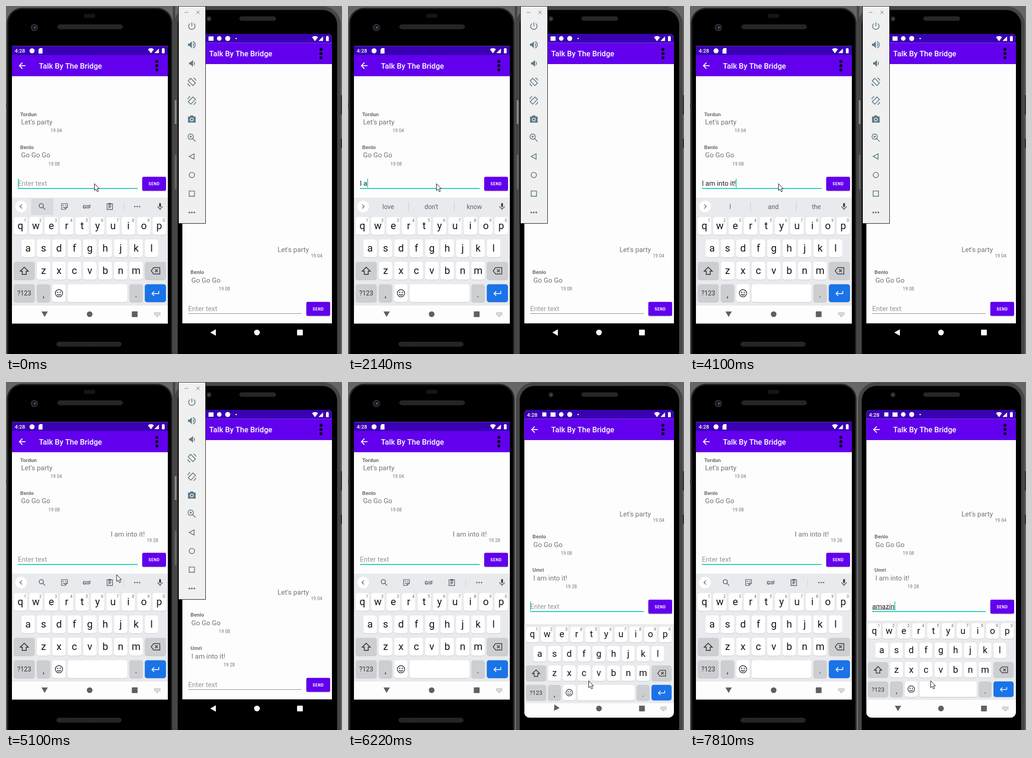
Write an HTML page with a canvas that moves like this. It is 735 px wide and 761 px high and loops after 8000 ms.

```html
<!DOCTYPE html>
<html lang="en">
<head>
<meta charset="utf-8">
<title>Two phones chatting</title>
<style>
html, body { margin: 0; height: 100%; overflow: hidden; background: #000; }
canvas { display: block; }
</style>
</head>
<body>
<canvas id="stage" width="735" height="761"></canvas>
<script>
const ctx = document.getElementById('stage').getContext('2d');
const LOOP = 8000;
const PURPLE = '#6200ee', DARK_PURPLE = '#3a00b3', TEAL = '#16cdbb', SLATE = '#5b7886', GREY = '#757575', KEY_INK = '#5f6368';
const TITLE = 'Talk By The Bridge';
const FIRST = 'Tordun', SECOND = 'Benlo', THIRD = 'Umri';

const RAISE_RIGHT = 5800, FOCUS_RIGHT = 5910, KEYBOARD_UP = 6080, KEYBOARD_DONE = 6340;

const LEFT = { x: 13, right: 354, top: 87.5, bar: 107, body: 153.5 };
const RIGHT = { x: 385.5, right: 713, top: 61, bar: 80.5, body: 127 };
const LEFT_KEYS = { x: 14.6, cell: 33.75, cy: 481, pitch: 49, h: 39, size: 22 };
const RIGHT_KEYS = { x: 387.1, cell: 32.3, cy: 544.5, pitch: 42.4, h: 34, size: 20 };

// time, text, index where the composing underline starts, suggestions
const LEFT_TYPING = [
  [0, '', -1, null],
  [420, 'I', -1, []],
  [610, 'I', 0, []],
  [650, 'I', 0, ['I', "I'm", "I'll"]],
  [1970, 'I ', 0, ['I', "I'm", "I'll"]],
  [2140, 'I a', -1, ['love', "don't", 'know']],
  [2270, 'I a', 2, ['a', 'am', 'and']],
  [2430, 'I am', 2, ['am', 'an', 'amazing']],
  [2640, 'I am ', 2, ['am', 'an', 'amazing']],
  [2680, 'I am ', -1, ['not', 'a', 'so']],
  [2720, 'I am i', -1, ['not', 'a', 'so']],
  [2760, 'I am i', 5, ['in', 'I', 'interested']],
  [2900, 'I am in', 5, ['in', 'I', 'interested']],
  [3000, 'I am int', 5, ['int', 'into', 'interested']],
  [3060, 'I am into', 5, ['into', 'intro', 'onto']],
  [3100, 'I am into ', 5, ['into', 'intro', 'onto']],
  [3310, 'I am into i', -1, ['a', 'the', 'it']],
  [3530, 'I am into i', 10, ['it', 'I', 'is']],
  [3570, 'I am into it', 10, ['it', 'I', 'is']],
  [3600, 'I am into it', 10, ['it', 'its', "it's"]],
  [3860, 'I am into it!', 10, ['it', 'its', "it's"]],
  [4100, 'I am into it!', -1, ['I', 'and', 'the']],
  [4260, '', -1, null]
];
const RIGHT_TYPING = [
  [0, '', -1], [7000, 'a', -1], [7080, 'a', 0], [7150, 'am', 0], [7400, 'ama', 0],
  [7520, 'amaz', 0], [7640, 'amazi', 0], [7810, 'amazin', 0]
];
const LEFT_BLINK = [[200, 420], [1100, 1600], [4760, 5260], [5760, 6260], [6700, 7190], [7700, 8000]];
const RIGHT_BLINK = [[0, FOCUS_RIGHT], [6410, 6910]];
const POINTER_PATH = [[5020, 193, 388], [5100, 240, 419], [5180, 365, 560], [5260, 480, 672], [5560, 480, 672], [5640, 526, 653]];

const latest = (steps, t) => steps.findLast(step => step[0] <= t);
const within = (spans, t) => spans.some(([from, to]) => t >= from && t < to);

function box(x, y, w, h, color, r = 0, stroke) {
  ctx.beginPath();
  ctx.roundRect(x, y, w, h, r);
  if (color) { ctx.fillStyle = color; ctx.fill(); }
  if (stroke) { ctx.strokeStyle = stroke; ctx.lineWidth = 1; ctx.stroke(); }
}
function disc(x, y, r, color) {
  ctx.fillStyle = color;
  ctx.beginPath();
  ctx.arc(x, y, r, 0, 7);
  ctx.fill();
}
function label(text, x, y, size, color, { weight = 400, align = 'left', spacing = 0 } = {}) {
  ctx.font = `${weight} ${size}px Roboto, sans-serif`;
  ctx.letterSpacing = spacing + 'px';
  ctx.textAlign = align;
  ctx.fillStyle = color;
  ctx.fillText(text, x, y);
  return ctx.measureText(text).width;
}
// Icons live on a 24-unit grid centred on x, y.
function icon(x, y, size, color, lines, solid, width = 2) {
  ctx.save();
  ctx.translate(x - size / 2, y - size / 2);
  ctx.scale(size / 24, size / 24);
  ctx.strokeStyle = ctx.fillStyle = color;
  ctx.lineWidth = width;
  if (lines) ctx.stroke(new Path2D(lines));
  if (solid) ctx.fill(new Path2D(solid), 'evenodd');
  ctx.restore();
}
function dots(x, y, gap, r, color, vertical) {
  for (const i of [-1, 0, 1]) disc(x + (vertical ? 0 : i * gap), y + (vertical ? i * gap : 0), r, color);
}
function triangle(x, y, r, angle, color) {
  ctx.fillStyle = color;
  ctx.beginPath();
  for (let i = 0; i < 3; i++) {
    const a = angle + i * Math.PI * 2 / 3;
    ctx.lineTo(x + r * Math.cos(a), y + r * Math.sin(a));
  }
  ctx.fill();
}

function speaker(x, y, w, h) {
  box(x, y, w, h, '#242424', h / 2, '#343434');
  ctx.strokeStyle = '#303030';
  ctx.lineWidth = 1;
  ctx.setLineDash([2, 2]);
  ctx.beginPath();
  ctx.moveTo(x + 4, y + h / 2);
  ctx.lineTo(x + w - 4, y + h / 2);
  ctx.stroke();
  ctx.setLineDash([]);
}
function shell(x, y, w, r, rim, rimColor) {
  box(x, y, w, 820, rimColor, r, '#5c5c5c');
  box(x + rim, y + rim, w - 2 * rim, 820, '#000', r - rim, '#2c2c2c');
}

function header(s) {
  const w = s.right - s.x, mid = s.top + 10.5;
  box(s.x, s.top, w, s.bar - s.top, DARK_PURPLE);
  box(s.x, s.bar, w, s.body - s.bar, PURPLE);
  label('4:28', s.x + 6, mid + 4, 11.6, '#fff', { weight: 500 });
  icon(s.right - 37, mid, 13, '#fff', '', 'M12 22L0 6a18 18 0 0 1 24 0z');
  icon(s.right - 24.5, mid, 12, '#fff', '', 'M2 22L22 2v20z');
  box(s.right - 13, mid - 5, 6, 10.5, '#fff', 1);
  box(s.right - 11.5, mid - 6, 3, 2, '#fff');
  const cy = s.bar + 23.5;
  icon(s.x + 23, cy, 18, '#fff', 'M21 12H4M12 3l-9 9 9 9', '', 2.4);
  label(TITLE, s.x + 59, cy + 6.3, 16.6, '#fff', { weight: 500 });
  dots(s.right - 24, cy, 9.2, 3.3, '#000', true);
}
function incoming(s, y, name, text, time) {
  label(name, s.x + 18, y - 18.5, 11.6, '#6f6f6f', { weight: 700 });
  const w = label(text, s.x + 20, y, 15, GREY);
  label(time, s.x + 16 + w, y + 17.4, 10, GREY);
}
function outgoing(s, y, text, time) {
  label(text, s.right - 50.5, y, 15, GREY, { align: 'right' });
  label(time, s.right - 46, y + 11.5, 10, GREY);
}
function inputRow(s, y, [, text, from], focused, caret) {
  const x = s.x + 13, size = 15;
  if (text) label(text, x, y + 5, size, '#212121');
  else label('Enter text', x, y + 5, size, '#969696');
  const width = part => ctx.measureText(part).width;
  if (from >= 0) {
    const start = width(text.slice(0, from));
    box(x + start, y + 6.3, width(text.trimEnd()) - start, 1, '#333');
  }
  box(x, Math.floor(y + 10.5), s.right - 66 - x, focused ? 2 : 1, focused ? TEAL : '#858585');
  if (caret) box(x + (text ? width(text) : 0), y - 10.5, 1.7, 19.5, TEAL);
  ctx.save();
  ctx.shadowColor = 'rgba(0,0,0,.3)';
  ctx.shadowBlur = 2;
  ctx.shadowOffsetY = 1;
  box(s.right - 56, y - 14.5, 52, 30.5, PURPLE, 3);
  ctx.restore();
  label('SEND', s.right - 30, y + 4, 8.6, '#fff', { weight: 700, align: 'center', spacing: 0.7 });
}

function keyboard({ x, cell, cy, pitch, h, size }, shifted) {
  const key = (from, span, row, color) => {
    const left = x + from * cell + 2.2, top = cy + row * pitch - h / 2;
    box(left, top + 1, span * cell - 4.4, h, '#c3c6ca', 5);
    box(left, top, span * cell - 4.4, h, color, 5);
    return [left + span * cell / 2 - 2.2, cy + row * pitch];
  };
  const letters = (row, start, keys) => [...keys].forEach((char, i) => {
    const [kx, ky] = key(start + i, 1, row, '#fff');
    label(char, kx, ky + size * 0.32, size, '#151515', { align: 'center' });
    if (row === 0) label((i + 1) % 10, kx + cell * 0.3, ky - h * 0.24, 8.6, KEY_INK, { align: 'center' });
  });
  const GREY_KEY = '#cdced2', scale = size / 22;
  letters(0, 0, 'qwertyuiop');
  letters(1, 0.5, 'asdfghjkl');
  letters(2, 1.5, 'zxcvbnm');
  let [kx, ky] = key(0, 1.5, 2, GREY_KEY);
  const arrow = 'M12 3L2 13h5v8h10v-8h5z';
  icon(kx, ky, 21 * scale, '#333', arrow, shifted ? arrow : '');
  [kx, ky] = key(8.5, 1.5, 2, GREY_KEY);
  icon(kx, ky, 21 * scale, '#444', 'M7.5 4H23v16H7.5L1.5 12zM11 8.5l7 7M18 8.5l-7 7');
  [kx, ky] = key(0, 1.5, 3, GREY_KEY);
  label('?123', kx, ky + 5, 14 * scale, '#333', { align: 'center' });
  [kx, ky] = key(1.5, 1, 3, GREY_KEY);
  label(',', kx, ky + 9, 19 * scale, '#333', { align: 'center' });
  [kx, ky] = key(2.5, 1, 3, '#fff');
  icon(kx, ky, 19 * scale, '#333', 'M22 12a10 10 0 1 1-20 0 10 10 0 0 1 20 0M7 14a5.5 5.5 0 0 0 10 0', 'M7 8h3v3H7zM14 8h3v3h-3z');
  key(3.5, 4, 3, '#fff');
  [kx, ky] = key(7.5, 1, 3, GREY_KEY);
  label('.', kx, ky + 9, 19 * scale, '#333', { align: 'center' });
  [kx, ky] = key(8.5, 1.5, 3, '#1a73e8');
  icon(kx, ky, 20 * scale, '#fff', 'M21 6v7H4M9 7l-6 6 6 6');
}
function suggestionStrip(words, highlight) {
  const y = 438.5;
  if (highlight) box(55, 421, 48.5, 36, '#d8dadd');
  disc(33, y, 12.8, '#fff');
  icon(33, y, 15, '#444', words ? 'M9 5l7 7-7 7' : 'M15 5l-7 7 7 7');
  icon(337, y, 17, '#444', 'M5 11a7 7 0 0 0 14 0M12 18v5', 'M9 4a3 3 0 0 1 6 0v7a3 3 0 0 1-6 0z');
  if (words) {
    words.forEach((word, i) => label(word, 88 + i * 94.2, y + 5.5, 14, KEY_INK, { align: 'center' }));
    for (const x of [132, 232]) box(x, 428, 1, 20, '#c4c7cb');
    return;
  }
  icon(79, y, 17, KEY_INK, 'M16 9.5a6.5 6.5 0 1 1-13 0 6.5 6.5 0 0 1 13 0M14.5 14.5l7 7', '', 2.4);
  icon(128, y, 17, KEY_INK, 'M3 3h18v11l-7 7H3zM21 14h-7v7M7 13a5 5 0 0 0 7 2', 'M7 7h3v3H7zM14 7h3v3h-3z');
  label('GIF', 177, y + 4, 11, KEY_INK, { weight: 900, align: 'center', spacing: 0.5 });
  icon(227, y, 18, KEY_INK, 'M4 4h16v17H4zM8 10h8M8 13h8M8 16h5', 'M8 2h8v5H8z');
  box(257, 430, 1, 17, '#cfd2d5');
  dots(287, y, 5.2, 1.6, KEY_INK);
}
function keyboardIcon(x, y, color) {
  for (let row = 0; row < 3; row++)
    for (let col = 0; col < 6; col++) box(x - 6.6 + col * 2.4, y - 4 + row * 2.4, 1.2, 1.2, color);
  box(x - 2.5, y + 3.8, 5, 1, color);
}
function navigation(s, y, color, angle, withKeyboard) {
  const [back, home, recent, keys] = s === LEFT ? [84.5, 183, 281.5, 331] : [455, 549, 643, 690];
  triangle(back, y - 2 * Math.sin(angle), 8, angle, color);
  disc(home, y, 6.2, color);
  box(recent - 6.3, y - 6.3, 12.6, 12.6, color, 1);
  if (withKeyboard) keyboardIcon(keys, y, color);
}

function leftPhone(t) {
  const s = LEFT, typing = latest(LEFT_TYPING, t), sent = t >= 4260;
  shell(1.5, 3.5, 363, 34, 3, '#1d1d1d');
  box(0, 212, 3, 10, '#3c3c3c');
  box(171, 17, 24, 9, '#151515', 3);
  disc(62, 47, 8, '#2b2b2f');
  disc(62, 47, 5, '#15151f');
  disc(63, 47, 2, '#63639a');
  speaker(113, 41, 142, 9);
  speaker(111, 735, 141, 9);
  box(s.x, s.top, 341, 694.5 - s.top, '#fdfdfd');
  header(s);
  disc(57, 98, 5.5, '#fff');
  icon(75.5, 98, 13, '#fff', '', 'M9 1h11v22H4V7z');

  ctx.save();
  ctx.beginPath();
  ctx.rect(s.x, 166, 341, 200);
  ctx.clip();
  const y = sent ? 193 : 259;
  incoming(s, y, FIRST, "Let's party", '19 04');
  incoming(s, y + 72.3, SECOND, 'Go Go Go', '19 08');
  if (sent) outgoing(s, 338, 'I am into it!', '19 28');
  ctx.restore();

  inputRow(s, 388, typing, true, !within(LEFT_BLINK, t));
  box(s.x, 419, 341, 236, '#e8eaed');
  suggestionStrip(typing[3], t < 420);
  keyboard(LEFT_KEYS, within([[420, 450], [3860, 3900]], t));
  navigation(s, 674, '#5f6063', Math.PI / 2, true);
}

function rightPhone(t) {
  const s = RIGHT, lifted = t >= KEYBOARD_UP, received = t >= 4360;
  const progress = Math.min(1, Math.max(0, (t - KEYBOARD_UP) / (KEYBOARD_DONE - KEYBOARD_UP)));
  shell(367.5, 0.5, 365, 40, 8, '#454545');
  box(732.5, 195, 3, 42, '#2e2e2e');
  box(732.5, 290, 3, 20, '#2e2e2e');
  disc(444, 28, 5.5, '#25252a');
  disc(444, 28, 2.5, '#45454e');
  speaker(511, 23.5, 79, 8);

  ctx.save();
  ctx.beginPath();
  ctx.roundRect(s.x, s.top, s.right - s.x, (lifted ? 734 : 694) - s.top, lifted ? [9, 9, 12, 12] : [9, 9, 0, 0]);
  ctx.clip();
  box(s.x, s.top, 328, 680, '#fdfdfd');
  header(s);
  box(425, 66.5, 9, 9, '#fff');
  box(443, 66.5, 11, 9.5, '#fff');
  disc(466.5, 71, 5, '#fff');
  disc(485, 71, 5.5, '#fff');
  disc(503.5, 71, 1.6, '#fff');

  const lift = lifted ? 171 : 0, y = (received ? 465.3 : 538.3) - lift;
  outgoing(s, y, "Let's party", '19 04');
  incoming(s, y + 66.3, SECOND, 'Go Go Go', '19 08');
  if (received) incoming(s, y + 139.2, THIRD, 'I am into it!', '19 28');
  const focused = t >= FOCUS_RIGHT;
  inputRow(s, 661.5 - lift, latest(RIGHT_TYPING, t), focused, focused && !within(RIGHT_BLINK, t));
  if (lifted) {
    const drop = 172 * (1 - progress) ** 4;
    box(s.x, 522 + drop, 328, 173, '#e8eaed');
    keyboard({ ...RIGHT_KEYS, cy: RIGHT_KEYS.cy + drop }, false);
  }
  ctx.restore();
  const turn = 1 - (1 - progress) ** 1.2;
  navigation(s, 714, lifted ? '#5f6063' : '#fff', Math.PI * (1 - turn / 2), focused);
}

function toolbar() {
  box(377.5, 0.5, 59, 475, '#f0f0f0', 0, '#111');
  icon(395, 14, 12, '#777', 'M4 12h16');
  icon(420, 14, 12, '#666', 'M5 5l14 14M19 5L5 19');
  const x = 406.5, horn = 'M2 9v6h4l6 6V3L6 9z';
  const tools = [
    ['M12 2v11M7 5.2a8.5 8.5 0 1 0 10 0'],
    ['M15 8a5 5 0 0 1 0 8M15 3.5a9 9 0 0 1 0 17', horn],
    ['M17 8a5 5 0 0 1 0 8', 'M5 9v6h4l6 6V3L9 9z'],
    ['M9 2.5L21.5 15 15 21.5 2.5 9zM16 1.5a9 9 0 0 1 6.5 7M8 22.5A9 9 0 0 1 1.5 15.5'],
    ['M15 2.5L2.5 15 9 21.5 21.5 9zM8 1.5a9 9 0 0 0-6.5 7M16 22.5a9 9 0 0 0 6.5-7'],
    ['', 'M2 5h5l2-3h6l2 3h5v16H2zM17 13a5 5 0 1 0-10 0 5 5 0 0 0 10 0M15 13a3 3 0 1 0-6 0 3 3 0 0 0 6 0'],
    ['M16 9a7 7 0 1 1-14 0 7 7 0 0 1 14 0M14 14l8 8M6 9h6M9 6v6'],
    ['M18 5v14L5 12z'],
    ['M19 12a7 7 0 1 1-14 0 7 7 0 0 1 14 0'],
    ['M5 5h14v14H5z']
  ];
  tools.forEach(([lines, solid], i) => icon(x, 44 + i * 40.7, 20, SLATE, lines, solid));
  dots(x, 451.5, 5.5, 1.9, SLATE);
}

function pointer(t) {
  const next = POINTER_PATH.findIndex(point => point[0] > t);
  let [, x, y] = POINTER_PATH.at(-1);
  if (next === 0) [, x, y] = POINTER_PATH[0];
  else if (next > 0) {
    const a = POINTER_PATH[next - 1], b = POINTER_PATH[next], k = (t - a[0]) / (b[0] - a[0]);
    x = a[1] + (b[1] - a[1]) * k;
    y = a[2] + (b[2] - a[2]) * k;
  }
  const arrow = new Path2D('M0 0v15l3.5-3 2.6 5.6 2.6-1.2L6.2 11H10.5z');
  ctx.save();
  ctx.translate(x + 0.5, y + 0.5);
  ctx.fillStyle = '#fff';
  ctx.strokeStyle = '#000';
  ctx.lineWidth = 1;
  ctx.fill(arrow);
  ctx.stroke(arrow);
  ctx.restore();
}

function draw(now) {
  const t = now % LOOP;
  box(0, 0, 735, 761, '#666');
  if (t < RAISE_RIGHT) {
    rightPhone(t);
    box(365, 0, 5, 761, '#444');
    leftPhone(t);
    box(369, 206, 4, 52, '#8a8a8a', 1);
    box(369, 325, 4, 76, '#666', 1);
    toolbar();
  } else {
    leftPhone(t);
    rightPhone(t);
  }
  pointer(t);
}
const start = performance.now();
function tick() {
  draw(performance.now() - start);
  requestAnimationFrame(tick);
}
tick();
</script>
</body>
</html>
```
